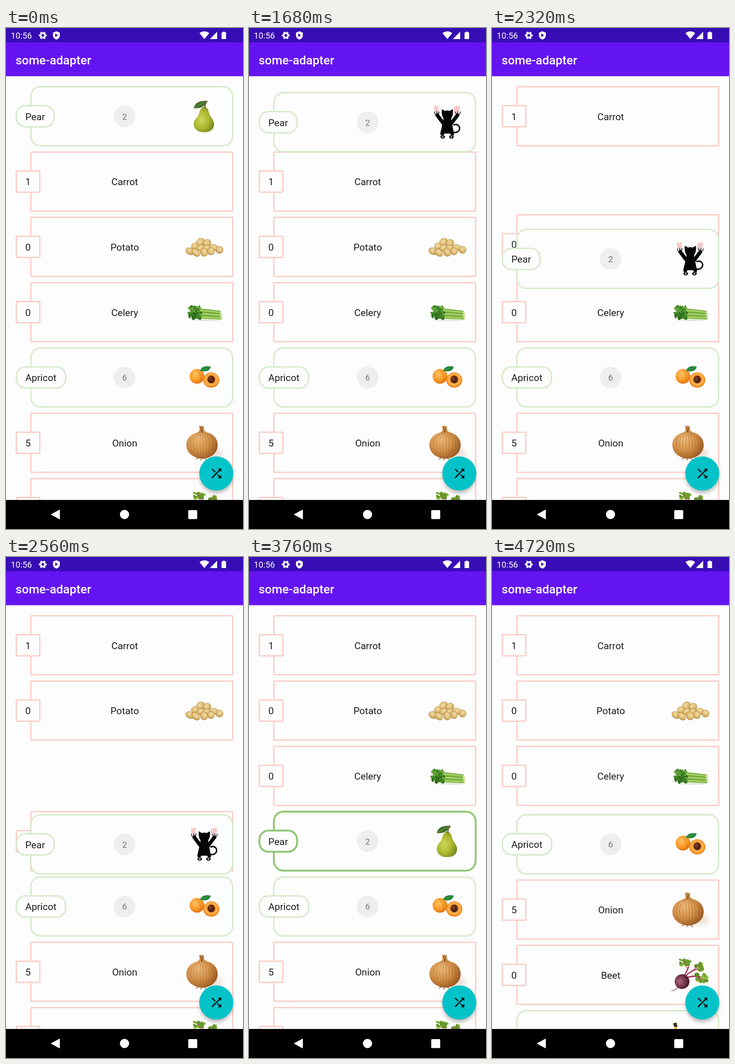
An HTML page for the animation above (4800 ms loop, 515 by 1087 pixels).

```html
<!DOCTYPE html>
<html lang="en">
<head>
<meta charset="utf-8">
<title>some-adapter</title>
<style>
  html, body { margin: 0; width: 100%; height: 100%; overflow: hidden; background: #fdfdfd; }
  svg { display: block; width: 100%; height: 100%; font-family: Roboto, "Open Sans", sans-serif; }
  .label { font-size: 21px; fill: #1d1d1d; }
  .count { font-size: 18.4px; fill: #777; }
  .box { fill: #fdfdfd; stroke-width: 3; }
  .veg .box { stroke: #fbcfc9; }
  .fruit .box { stroke: #d5eac9; }
  .pressed .box { stroke: #90c671; stroke-width: 4; }
</style>
</head>
<body>
<svg viewBox="0 0 515 1087">
  <defs>
    <radialGradient id="pearSkin" cx=".38" cy=".5" r=".65">
      <stop offset="0" stop-color="#d3d55c"/><stop offset=".55" stop-color="#acb82f"/><stop offset="1" stop-color="#748420"/>
    </radialGradient>
    <radialGradient id="potatoSkin" cx=".45" cy=".35" r=".7">
      <stop offset="0" stop-color="#f2dcA0"/><stop offset=".6" stop-color="#dfbd78"/><stop offset="1" stop-color="#b5883f"/>
    </radialGradient>
    <radialGradient id="apricotSkin" cx=".4" cy=".35" r=".7">
      <stop offset="0" stop-color="#ffc266"/><stop offset=".6" stop-color="#f99a26"/><stop offset="1" stop-color="#dd6a0c"/>
    </radialGradient>
    <radialGradient id="onionSkin" cx=".38" cy=".42" r=".65">
      <stop offset="0" stop-color="#eebd7e"/><stop offset=".55" stop-color="#d3924a"/><stop offset="1" stop-color="#9c5a22"/>
    </radialGradient>
    <radialGradient id="beetSkin" cx=".38" cy=".4" r=".65">
      <stop offset="0" stop-color="#a8687c"/><stop offset=".5" stop-color="#7b3a50"/><stop offset="1" stop-color="#45182a"/>
    </radialGradient>
    <filter id="soft" x="-50%" y="-50%" width="200%" height="200%"><feGaussianBlur stdDeviation="4"/></filter>
  </defs>
  <rect width="515" height="1087" fill="#fdfdfd"/>
  <g id="list"></g>
  <ellipse cx="457" cy="972" rx="36" ry="37" fill="#000" opacity=".28" filter="url(#soft)"/>
  <circle cx="457" cy="966.5" r="37" fill="#03c3c8"/>
  <path transform="translate(441.5 950.7) scale(1.3125)" d="M10.59 9.17L5.41 4 4 5.41l5.17 5.17 1.42-1.41zM14.5 4l2.04 2.04L4 18.59 5.41 20 17.96 7.46 20 9.5V4h-5.5zm.33 9.41l-1.41 1.41 3.13 3.13L14.5 20H20v-5.5l-2.04 2.04-3.13-3.13z"/>
  <rect y="104" width="515" height="1.5" fill="#e9e4f3"/>
  <rect y="31" width="515" height="73.5" fill="#6414f1"/>
  <rect width="515" height="31" fill="#390db5"/>
  <text x="21" y="78.5" font-size="26.25" font-weight="500" fill="#fff">some-adapter</text>
  <text x="10.5" y="23" font-size="18.4" fill="#fff">10:56</text>
  <g fill="none" stroke="#fff">
    <circle cx="80" cy="16" r="4.8" stroke-width="3.6"/>
    <circle cx="80" cy="16" r="7" stroke-width="3" stroke-dasharray="4 3.33" stroke-dashoffset="2"/>
  </g>
  <g fill="#fff">
    <path d="M109.5 7l7.5 3.3v5.5c0 4.6-3.2 8-7.5 9.2-4.3-1.2-7.5-4.6-7.5-9.2v-5.5z"/>
    <path d="M107 11.8v8l6-4z" fill="#390db5"/>
    <path d="M431 24L420.5 11.3a16 16 0 0 1 21 0z"/>
    <path d="M443 24h15.8V8z"/>
    <path d="M471 8h4.6v1.6h2.6V24h-9.8V9.6h2.6z"/>
  </g>
  <rect y="1024" width="515" height="63"/>
  <g fill="#fff">
    <path d="M98 1055.5L116.500 1045.500V1065.500Z" stroke="#fff" stroke-linejoin="round"/>
    <circle cx="257.500" cy="1055.500" r="10"/>
    <rect x="396" y="1046" width="19.500" height="19.500" rx="2"/>
  </g>
</svg>
<script>
const LOOP = 4800, STEP = 80, TOP = 126, PITCH = 141.7, MOVE = 250;

let seed = 7;
const rnd = (a, b) => a + (b - a) * ((seed = seed * 16807 % 2147483647) / 2147483647);
const repeat = (n, fn) => Array.from({ length: n }, (_, i) => fn(i)).join('');
const ball = (x, y, rx, ry, fill, turn = 0) =>
  `<ellipse cx="${x}" cy="${y}" rx="${rx}" ry="${ry}" fill="${fill}" transform="rotate(${turn} ${x} ${y})"/>`;
const shape = (d, fill) => `<path d="${d}" fill="${fill}"/>`;
const line = (d, color, w) =>
  `<path d="${d}" fill="none" stroke="${color}" stroke-width="${w}" stroke-linecap="round"/>`;
const shade = (x, y, rx, ry) => `<g filter="url(#soft)" opacity=".3">${ball(x, y, rx, ry, '#c9a58a')}</g>`;
const pick = (list, i) => list[i % list.length];

// Pictures: x on the stage, y from the top of the card.
const art = {
  pear: () => ball(431, 99, 15, 1.5, '#ddd') +
    shape('M431 45C438 45 440 53 442 61C445 69 452 73 452 83C452 95 442 100 430 100C418 100 408 94 408 82C408 72 416 69 419 61C421 53 424 45 431 45Z', 'url(#pearSkin)') +
    line('M432 47Q432 38 437 33', '#6d4a2c', 2.4) +
    shape('M408 48Q411 31 436 32Q432 50 408 48Z', '#46722d') + line('M410 47L432 34', '#7d9e58', .8),
  potato: () => [[423, 55, 9, 8], [437, 57, 8, 7.5], [411, 64, 8, 7], [424, 68, 9, 7], [437, 68, 8, 6], [452, 67, 9, 6.500],
    [400, 75, 9.500, 7], [464, 72, 7.500, 7.500], [412, 78, 10, 6.500], [445, 75, 8, 7.500], [430, 77, 9, 7.500]]
    .map(([x, y, rx, ry], i) => ball(x, y, rx + .6, ry + .6, '#a97f3c', i * 9 - 30) +
      ball(x, y, rx, ry, 'url(#potatoSkin)', i * 9 - 30)).join(''),
  celery: () => ball(437, 83, 28, 2, '#e4e8de') +
    repeat(9, i => line(`M${408 + i % 3 * 3} ${58 + i * 2.5}Q${436} ${60 + i * 2.300} ${465 + i % 3} ${64 + i * 2}`,
      pick(['#6ba432', '#b4d67b', '#8abf4c'], i), 3.2)) +
    ball(467, 72, 2.2, 8, '#c7df9a', -8) +
    repeat(50, i => ball(rnd(399, 423), rnd(51, 78), rnd(2, 5.5), rnd(2, 4), pick(['#3f8426', '#2f6d1c', '#66a63a', '#4d9430'], i), rnd(0, 90))),
  apricot: () => ball(415, 63, 16, 16, 'url(#apricotSkin)') +
    ball(446, 71, 17.500, 16.500, '#ef8114') + ball(446, 70, 15.500, 14.500, '#fbab45') +
    ball(446, 69.500, 9, 9, '#c55f16') + ball(446, 70, 7.500, 8, '#532516') + ball(444, 68, 3, 4, '#794024') +
    line('M414 49Q424 57 423 72', '#d36f13', 1) +
    shape('M421 51Q427 38 445 42Q442 56 421 51Z', '#218338') + line('M423 50L442 43', '#63ad61', .8),
  onion: () => shade(452, 88, 19, 11) +
    shape('M419 28Q424 32 425 27Q427 31 430 29Q428 40 438 43C452 47 460 58 460 70C460 88 445 99 427 100C408 99 392 88 392 70C392 56 402 46 416 43Q423 40 419 28Z', 'url(#onionSkin)') +
    repeat(8, i => line(`M${420 + i * 1.6} 42C${392 + i * 9} 55 ${396 + i * 8.500} 86 ${421 + i * 1.600} 99`, '#9b5a22', .6)) +
    line('M423 31L425 42M428 32L426 42', '#875022', 1.800) +
    line('M417 99L413 101M425 100L423 103M432 100L436 103', '#896338', 1.500),
  beet: () => line('M416 70Q424 58 427 48M419 70Q432 55 449 52M420 72Q438 66 455 70', '#a92d57', 2.6) +
    repeat(36, i => {
      const [x, y] = pick([[421, 40], [446, 48], [455, 72]], i);
      return ball(x + rnd(-11, 11), y + rnd(-7, 8), rnd(3, 6), rnd(2, 5), pick(['#76a930', '#5c8f25', '#93c143', '#679b2a'], i >> 1), rnd(0, 90));
    }) +
    line('M426 55L417 36M430 60L452 43M434 67L462 77', '#ae4052', 1.200) +
    line('M406 91Q399 99 390 100', '#7c4450', 1.200) + ball(413, 80, 16, 16, 'url(#beetSkin)', -30),
  banana: () => shape('M394 29L402 28L402 40Q414 76 460 82Q450 104 420 95Q392 82 397 42Z', '#e9c63f') +
    shape('M393 29L401 27L403 36L397 37Z', '#36301d'),
  cat: () => line('M404 30V41M407 32V45M410.500 30V46M447 32V46M450.500 30V45M453.500 31V45M456.500 30V40', '#e58378', 1.300) +
    line('M441 86C451 91 460 84 457 75Q453 68 445 71', '#050505', 3) +
    line('M424 70L409 50M438 70L453 50', '#050505', 8) +
    shape('M419 37L426 41Q431 39 436 41L443 37Q444 46 442 52Q438 57 440 63L445 88Q447 96 440 94L437 90H425L422 94Q415 96 416 88L422 63Q424 57 420 52Q418 45 419 37Z', '#050505') +
    [[408, 48], [454, 48]].map(([x, y]) => line(`M${x - 4} ${y}l-1-5M${x} ${y - 1}v-5M${x + 4} ${y}l1-5`, '#111', 1.500)).join('') +
    [421, 440].map(x => ball(x, 97, 5, 4, '#050505') + ball(x, 98, 1.800, 1.400, '#ddd') +
      repeat(3, i => ball(x - 2.600 + i * 2.600, 95, .8, .9, '#ddd'))).join('')
};

const items = [
  ['Carrot', 1], ['Potato', 0, 'potato'], ['Celery', 0, 'celery'], ['Apricot', 6, 'apricot', 110],
  ['Onion', 5, 'onion'], ['Beet', 0, 'beet'], ['Banana', 3, 'banana', 109], ['Pear', 2, 'pear', 85]
];

const rect = (x, y, w, h, r) =>
  `<rect class="box" x="${x + 1.5}" y="${y + 1.5}" width="${w - 3}" height="${h - 3}" rx="${r}"/>`;

// A fruit carries its name in the pill, a vegetable its count.
function card([name, count, pic, pill]) {
  const tag = pill ? name : count;
  const middle = pill
    ? `<circle cx="257.700" cy="65.500" r="23.500" fill="#eee"/><text class="count" x="257.700" y="72.500" text-anchor="middle">${count}</text>`
    : `<text class="label" x="258" y="73.500" text-anchor="middle">${name}</text>`;
  const g = document.createElementNS('http://www.w3.org/2000/svg', 'g');
  g.setAttribute('class', pill ? 'fruit' : 'veg');
  g.innerHTML = rect(52.500, 0, 441.500, 131, pill ? 21 : 1.500) + rect(21, 41, pill || 54, 49, pill ? 20 : 1.500) +
    `<text class="label" x="42" y="73.500">${tag}</text>` + middle +
    (pic ? `<g class="pic">${art[pic]()}</g>` : '');
  return document.getElementById('list').appendChild(g);
}

const cards = items.map(card);
const pear = cards.pop();
const pearPic = pear.querySelector('.pic');
pearPic.insertAdjacentHTML('afterend', `<g>${art.cat()}</g>`);
const catPic = pearPic.nextSibling;

const clamp = v => Math.max(0, Math.min(1, v));
const ease = v => (1 - Math.cos(Math.PI * clamp(v))) / 2;

// Finger path: time, distance, speed.
const path = [[1540, 0, 0], [2000, 126, .5], [2560, 432, .4], [2880, 516, .08], [3005, 519, 0]];

function finger(t) {
  if (t <= path[0][0]) return 0;
  const i = path.findIndex(p => t < p[0]);
  if (i < 0) return path[path.length - 1][1];
  const [t0, y0, v0] = path[i - 1], [t1, y1, v1] = path[i];
  const d = t1 - t0, u = (t - t0) / d, w = 1 - u;
  return w * w * ((1 + 2 * u) * y0 + u * d * v0) + u * u * ((3 - 2 * u) * y1 - w * d * v1);
}

// A neighbour gives way once the dragged card passes its slot.
const swaps = [1, 2, 3].map(n => {
  let t = path[0][0];
  while (finger(t) < n * PITCH) t += 4;
  return t + 12;
});

const place = (el, x, y) => el.setAttribute('transform', `translate(${x.toFixed(2)} ${y.toFixed(2)})`);
const show = (el, on) => el.setAttribute('visibility', on ? 'visible' : 'hidden');

function draw(t) {
  cards.forEach((el, i) => {
    const start = i < 3 ? swaps[i] : 4505;
    place(el, 0, TOP + (i + 1 - ease((t - start) / MOVE)) * PITCH);
  });
  const y = finger(t);
  const drop = ease((t - 3005) / MOVE);
  const swipe = -494 * clamp((t - 3800) / 600) ** 2.43;
  place(pear, swipe, TOP + y + (3 * PITCH - y) * drop);
  pear.setAttribute('display', t < 4400 ? 'inline' : 'none');

  const pressed = (t >= 1120 && t < 1280) || (t >= 3760 && t < 3840);
  pear.classList.toggle('pressed', pressed);
  const dragging = t >= 1280 && t < 3280;
  show(catPic, dragging);
  show(pearPic, !dragging);
}

const begin = performance.now();
function tick() {
  const t = (performance.now() - begin) % LOOP;
  draw(Math.floor(t / STEP) * STEP);
  requestAnimationFrame(tick);
}
draw(0);
tick();
</script>
</body>
</html>
```
